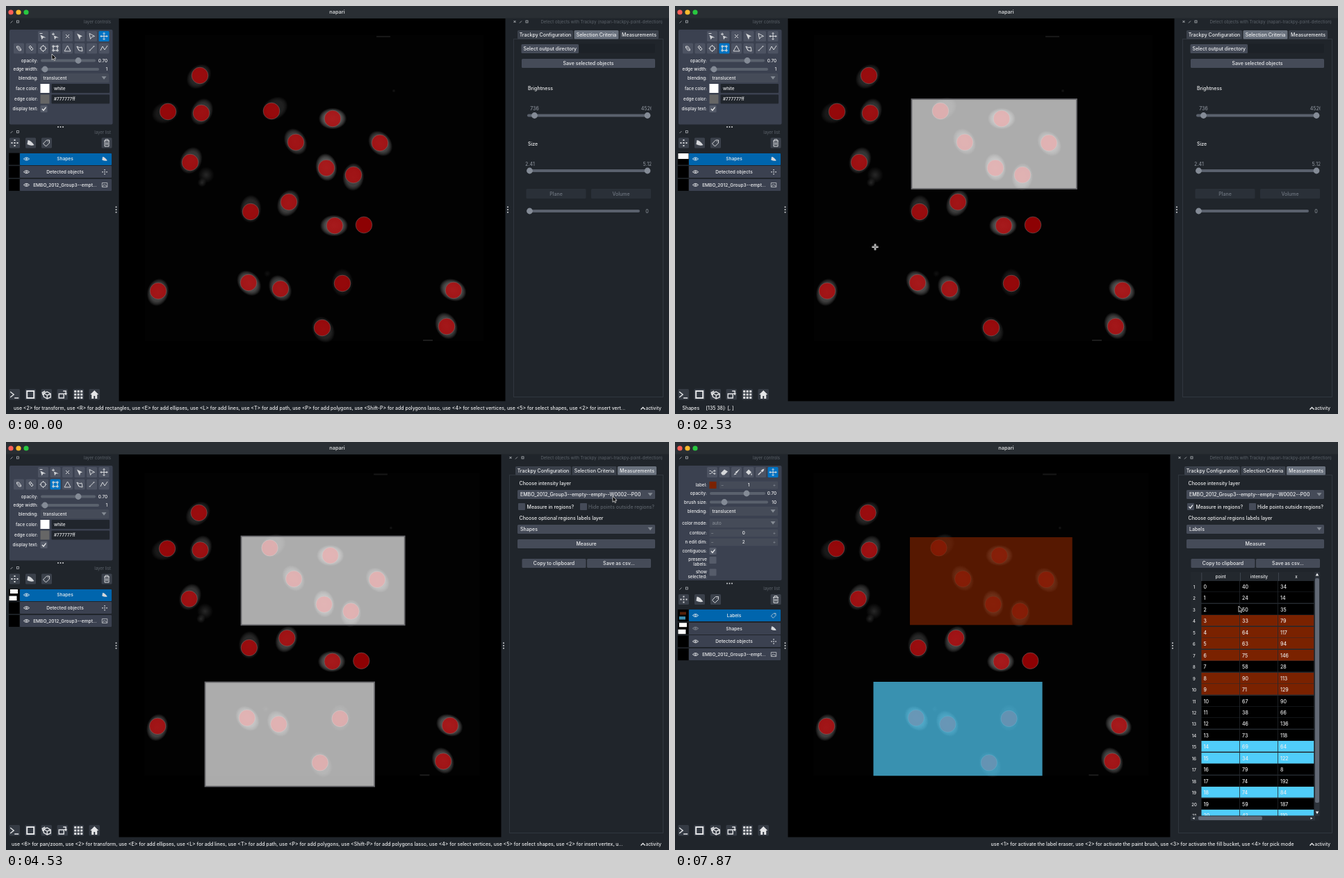
An HTML page with a canvas for the animation above (8000 ms loop, 954 by 587 pixels).

```html
<!DOCTYPE html>
<html>
<head>
<meta charset="utf-8">
<style>
html, body { margin: 0; width: 100%; height: 100%; overflow: hidden; background: #20252b; }
canvas { display: block; }
</style>
</head>
<body>
<canvas id="stage" width="954" height="587"></canvas>
<script>
const c = document.getElementById('stage').getContext('2d');
const BG = '#20252b', PANEL = '#3b4150', BTN = '#454b58', TRACK = '#5a616d', KNOB = '#848b96';
const BLUE = '#0065ad', TEXT = '#eeeff0', DIM = '#858b94', FAINT = '#5c636b', DARK = '#20252c';
const BROWN = '#7a2200', CYAN = '#50cdfa';
const LOOP = 8000, STEP = LOOP / 60;
const FILE = 'EMBO_2012_Group3--empty--empty--W0002--P00';

// x, y, halo angle, halo offset, halo brightness
const cells = [
  [279, 100, 135, 2, 24], [233, 152, 160, 4, 15], [281, 154, -65, 2, 32], [382, 151, -35, 6, 20],
  [470, 162, 0, 0, 55], [417, 196, -120, 1, 40], [538, 197, 50, 1, 44], [265, 225, -65, 3, 34],
  [461, 233, -100, 1, 52], [500, 243, 95, 3, 40], [407, 282, 115, 2, 40], [352, 296, -88, 4, 25],
  [473, 316, 180, 1, 50], [515, 315, 0, 0, 0], [219, 410, 105, 2, 42], [349, 398, 50, 1, 48],
  [395, 407, -120, 1, 42], [484, 399, -90, 1, 15], [644, 409, -155, 1, 50], [455, 463, 60, 3, 22],
  [634, 461, -115, 1, 44]];

const intensity = [40, 24, 50, 33, 64, 63, 75, 58, 90, 71, 67, 38, 46, 73, 69, 34, 79, 74, 74, 59, 42];
const column = [34, 14, 35, 79, 117, 94, 146, 28, 113, 129, 90, 66, 136, 118, 64, 122, 8, 192, 84, 187, 110];
const inTop = [3, 4, 5, 6, 8, 9], inBottom = [14, 15, 18, 20];

// time, x, y of the pointer
const path = [
  [0, 66, 69], [270, 69, 62], [550, 69, 62], [1070, 340, 137], [1200, 340, 137], [1330, 340.5, 134],
  [2000, 578, 263], [2130, 578, 263], [2500, 288, 347], [2600, 288, 346], [3190, 534, 497.5],
  [3470, 534, 497.5], [3950, 905, 40], [4150, 905, 40], [4520, 873, 78], [4700, 873, 78],
  [5200, 741, 92], [5500, 741, 92], [6100, 790, 128], [6650, 803, 154], [6850, 808, 146],
  [7150, 808, 146], [7600, 823, 232], [7730, 821, 238], [7860, 811, 236]];
const TOP = [340.5, 134, 578, 263], BOTTOM = [288, 346, 534, 497.5];

const p = s => new Path2D(s);
const icons = {
  vminus: [p('M-4-2L4 2L0 2L-2 5ZM-5-4.5H-1V-3.5H-5Z'), 1],
  vplus: [p('M-2-1L5 2L1 2L-1 5ZM-5-3.5H-1V-2.5H-5ZM-3.5-5H-2.5V-1H-3.5Z'), 1],
  x: [p('M-2.5-2.5L2.5 2.5M2.5-2.5L-2.5 2.5')], arrow: [p('M-4-4L4 0L1 1L0 5Z'), 1],
  select: [p('M-3.5-4L4 0L0 1L-2 4Z')],
  move: [p('M-5 0H5M0-5V5M-1.5-3.5L0-5L1.5-3.5M-1.5 3.5L0 5L1.5 3.5M-3.5-1.5L-5 0L-3.5 1.5M3.5-1.5L5 0L3.5 1.5')],
  front: [p('M-3-3H0L3 1V3H0L-3-1ZM-2-2L2 2')], back: [p('M-3-2L-1-4L3 1L1 3ZM-2 0L1-2')],
  ellipse: [p('M-3.5 0A3.5 3.5 0 1 0 3.5 0A3.5 3.5 0 1 0-3.5 0M-5 0H-3M3 0H5M0-5V-3M0 3V5')],
  rect: [p('M-3-3H3V3H-3ZM-4-4H-2V-2H-4ZM2-4H4V-2H2ZM-4 2H-2V4H-4ZM2 2H4V4H2Z')],
  tri: [p('M0-4L4.5 4H-4.5Z')], poly: [p('M-4-3L0-1L3-2L4 4L-1 3ZM-4-3L-1 3')],
  line: [p('M-3 3L3-3M-4 3H-2M2-3H4')], path: [p('M-5 3L-2-3L1 2L5-4')],
  shuffle: [p('M-4-2H-2L2 2H4M-4 2H-2L2-2H4M3-3.5L4.5-2L3-.5M3 .5L4.5 2L3 3.5')],
  eraser: [p('M-5 1L0-4L5-1L0 4H-3Z'), 1], brush: [p('M5-5L0 2L-2 0ZM-2 1L0 3L-4 4Z'), 1],
  fill: [p('M-4 0L0-4L4 0L0 4ZM4 1L5 4H3Z'), 1], picker: [p('M5-5L2-4L0-2L2 0L4-2ZM0-1L1 0L-3 4H-4V3Z'), 1],
  points: [p('M-1-1h2v2h-2zM-5-1h2v2h-2zM3-1h2v2h-2zM-1-5h2v2h-2zM-1 3h2v2h-2z'), 1],
  shapes: [p('M-4-4Q0-4 5 3Q1 5-5 2Z'), 1], tag: [p('M-5 1L0-4H4V0L-1 5ZM2-2.5V-1.5')],
  trash: [p('M-4-3H4M-2-3V-5H2V-3M-3-3V5H3V-3M-1-1V3M1-1V3')],
  eye: [p('M-4 0Q0-4 4 0Q0 4-4 0M-1 0A1 1 0 1 0 1 0A1 1 0 1 0-1 0')],
  image: [p('M-5-4H5V4H-5ZM-4 3L-1-1L1 1L2 0L4 3')],
  console: [p('M-6-4L-1 0L-6 4M0 5H6')], square: [p('M-5-5H5V5H-5Z')],
  cube: [p('M-4-2L1-4L6-1V4L1 6L-4 3ZM-4-2L1 1L6-1M1 1V6M-5 1L-6-3L-2-5')],
  roll: [p('M-5-1H2V5H-5ZM1-5H5V0M3-2L5 0L6-2')],
  grid: [p('M-6-6h3v3h-3zM-1.5-6h3v3h-3zM3-6h3v3h-3zM-6-1.5h3v3h-3zM-1.5-1.5h3v3h-3zM3-1.5h3v3h-3zM-6 3h3v3h-3zM-1.5 3h3v3h-3zM3 3h3v3h-3z'), 1],
  home: [p('M0-6L6 0H4V6H1V2H-1V6H-4V0H-6Z'), 1]
};

function text(s, x, y, size = 7, color = TEXT, align = 'left', weight = 500) {
  c.font = `${weight} ${size}px Inter, "Open Sans", sans-serif`;
  c.textAlign = align;
  c.fillStyle = color;
  c.fillText(s, x, y + size * .36);
}
function box(x, y, w, h, color, r = 0) {
  c.fillStyle = color;
  c.beginPath();
  c.roundRect(x, y, w, h, r);
  c.fill();
}
function dot(x, y, r, color) {
  c.fillStyle = color;
  c.beginPath();
  c.arc(x, y, r, 0, 7);
  c.fill();
}
function icon(name, x, y, color = '#d5d7da', width = 1) {
  const [shape, solid] = icons[name];
  c.save();
  c.translate(x, y);
  c.fillStyle = c.strokeStyle = color;
  c.lineWidth = width;
  solid ? c.fill(shape) : c.stroke(shape);
  c.restore();
}
function clipped(x, y, w, h, draw) {
  c.save();
  c.beginPath();
  c.rect(x, y, w, h);
  c.clip();
  draw();
  c.restore();
}
function triangle(x, y, w, h, color = DIM) {
  c.fillStyle = color;
  c.beginPath();
  c.moveTo(x - w, y - h);
  c.lineTo(x + w, y - h);
  c.lineTo(x, y + h);
  c.fill();
}
function button(s, x, y, w, h = 13, color = TEXT, fill = BTN) {
  box(x, Math.round(y - h / 2), w, h, fill, 1.5);
  text(s, x + w / 2, y, 7, color, 'center');
}
function combo(s, x, y, w, size = 7, color = TEXT) {
  box(x, Math.round(y - 6.5), w, 13, BTN, 1.5);
  clipped(x, y - 7, w - 18, 14, () => text(s, x + 4, y, size, color));
  triangle(x + w - 7, y, 3.5, 2.2);
}
function check(x, y, on, fill = '#565c6a') {
  box(x - 5, y - 5, 10, 10, fill, 1);
  if (!on) return;
  c.strokeStyle = TEXT;
  c.lineWidth = 1.2;
  c.stroke(p(`M${x - 2.5} ${y}l2 2.2l3.5-4.5`));
}
function track(x1, x2, y, ...knobs) {
  box(x1, y - 2, x2 - x1, 4, TRACK, 2);
  knobs.forEach(k => dot(k, y, 4.4, KNOB));
}
function dots(x, y, dx, dy) {
  for (let i = -1; i < 2; i++) dot(x + i * dx, y + i * dy, 1, '#d0d2d5');
}
function header(s, x, y, right) {
  c.strokeStyle = '#b0b4b8';
  c.lineWidth = .8;
  c.stroke(p(`M${x - 1.5} ${y + 1.5}l3-3`));
  c.strokeRect(x + 7.5, y - 2, 3, 3);
  text(s, right, y, 6.1, FAINT, 'right', 400);
}

function pointer(t) {
  let i = path.findIndex(k => k[0] > t);
  if (i < 0) return path[path.length - 1].slice(1);
  const [t0, x0, y0] = path[i - 1], [t1, x1, y1] = path[i];
  const u = (t - t0) / (t1 - t0), e = u * u * (3 - 2 * u);
  return [x0 + (x1 - x0) * e, y0 + (y1 - y0) * e];
}

function cell([x, y, angle, shift, light]) {
  if (light) {
    c.save();
    c.translate(x, y);
    c.rotate(angle * Math.PI / 180);
    c.translate(shift, 0);
    c.scale(1.3, 1);
    const g = c.createRadialGradient(0, 0, 0, 0, 0, 15.5);
    const gray = a => `rgba(175,175,175,${light / 100 * a})`;
    g.addColorStop(0, gray(1));
    g.addColorStop(.65, gray(.85));
    g.addColorStop(.83, gray(.5));
    g.addColorStop(1, gray(0));
    c.fillStyle = g;
    c.fillRect(-16, -16, 32, 32);
    c.restore();
  }
  dot(x, y, 11.8, 'rgba(200,0,4,.7)');
  c.strokeStyle = 'rgba(119,119,119,.6)';
  c.lineWidth = .8;
  c.stroke();
}

function region([x1, y1, x2, y2], active) {
  c.fillStyle = 'rgba(255,255,255,.67)';
  c.fillRect(x1, y1, x2 - x1, y2 - y1);
  c.strokeStyle = active ? '#0a7ac8' : '#66666a';
  c.lineWidth = 1.8;
  c.strokeRect(x1, y1, x2 - x1, y2 - y1);
  if (active) [[x1, y1], [x2, y1], [x1, y2], [x2, y2]].forEach(q => dot(...q, 3, '#0a7ac8'));
}

function viewer(s) {
  const right = s.measure ? 712.5 : 718.5;
  clipped(162.5, 18, right - 162.5, 550.5, () => {
    box(162, 18, 560, 551, '#000');
    if (s.measure) {
      c.translate(437.5, 293);
      c.scale(.9904, .9904);
      c.translate(-440.5, -293);
    }
    box(200, 42, 487, 440, '#020202');
    box(533, 43, 20, 2, '#171717');
    box(600, 480, 14, 2, '#1c1c1c');
    [[288, 243, 9, .2], [282, 254, 5, .2], [376, 385, 4, .08], [558, 122, 2, .12]].forEach(([x, y, r, a]) => {
      const g = c.createRadialGradient(x, y, 0, x, y, r * 1.3);
      g.addColorStop(0, `rgba(190,190,190,${a})`);
      g.addColorStop(1, 'rgba(190,190,190,0)');
      dot(x, y, r * 1.3, g);
    });
    cells.forEach(cell);
    if (s.labels) {
      c.globalAlpha = .7;
      box(340, 135.5, 236, 127.5, BROWN);
      box(287, 345.5, 245.5, 136.5, CYAN);
    } else {
      s.shapes.forEach((r, i) => region(r, i === s.active));
    }
  });
}

function slot(name, x, y, on) {
  box(x - 7.5, y - 7.5, 15, 15, on ? '#0074c4' : '#4d5362', 1.5);
  icon(name, x, y);
}
const label = (s, y) => text(s, 46, y, 6.3, TEXT, 'right');
const value = (s, y) => text(s, 146, y, 6.3, TEXT, 'right');
function spin(s, x, y) {
  box(x, y - 5.5, 148 - x, 11, BTN, 1);
  text('−', x + 2, y, 6.5, DIM);
  text(s, (x + 148) / 2, y, 6.3, TEXT, 'center');
  text('+', 143, y, 6.5, DIM, 'center');
}

function controls(s) {
  header('layer controls', 8, 23, 151);
  box(5, 34, 148.5, s.labels ? 165 : 136.5, PANEL, 2);
  const tools = s.labels ? ['shuffle', 'eraser', 'brush', 'fill', 'picker', 'move']
    : ['vminus', 'vplus', 'x', 'arrow', 'select', 'move'];
  tools.forEach((n, i) => slot(n, 53.5 + i * 17.5, 43.5, n === 'move' && !s.rectTool));
  if (s.labels) {
    label('label:', 62);
    box(49.5, 57, 10, 10, BROWN);
    spin('1', 64, 62);
    label('opacity:', 74); track(50, 130, 74, 103); value('0.70', 74);
    label('brush size:', 86.5); track(50, 134, 86.5, 71); value('10', 86.5);
    label('blending:', 99.5); combo('translucent', 49.5, 99.5, 98.5, 6.3);
    label('color mode:', 116.5); combo('auto', 49.5, 116.5, 98.5, 6.3, DIM);
    label('contour:', 131); spin('0', 49.5, 131);
    label('n edit dim:', 144); spin('2', 49.5, 144);
    label('contiguous:', 157); check(54.5, 157, true);
    label('preserve', 169); label('labels:', 176); check(54.5, 170);
    label('show', 187); label('selected:', 194); check(54.5, 187.5);
    return;
  }
  ['front', 'back', 'ellipse', 'rect', 'tri', 'poly', 'line', 'path'].forEach((n, i) =>
    slot(n, 18.5 + i * 17.5, 61, n === 'rect' && s.rectTool));
  label('opacity:', 78.5); track(50, 129, 78.5, 104); value('0.70', 78.5);
  label('edge width:', 91); track(50, 134, 91, 56); value('1', 91);
  label('blending:', 103.5); combo('translucent', 49.5, 103.5, 98.5, 6.3);
  [['face color:', 'white', '#fff', 118.5], ['edge color:', '#777777ff', '#666', 134]].forEach(([a, b, fill, y]) => {
    label(a, y);
    box(49.5, y - 6.5, 13, 13, fill);
    box(65.5, y - 6.5, 83.5, 13, DARK, 1);
    text(b, 69, y, 6.3);
  });
  label('display text:', 148); check(54.5, 148, true);
}

function layers(s) {
  const dy = s.labels ? 29.5 : 0;
  dots(78.5, 174 + dy, 3.5, 0);
  header('layer list', 8, 181.5 + dy, 151);
  [['points', 12.5], ['shapes', 35.5], ['tag', 58.5], ['trash', 145]].forEach(([n, x]) => {
    box(x - 7.5, 189.5 + dy, 15, 15, '#3b414b', 1.5);
    icon(n, x, 197 + dy);
  });
  const rows = [['Shapes', 'shapes'], ['Detected objects', 'points'], [FILE.slice(0, 22) + '...', 'image']];
  if (s.labels) rows.unshift(['Labels', 'tag']);
  rows.forEach(([name, kind], i) => {
    const y = 220 + dy + i * 18.7;
    box(4, y - 8.5, 15.5, 17, '#000');
    box(20, Math.round(y - 8.5), 132, 17, i ? PANEL : BLUE, 1);
    icon('eye', 29.5, y, s.labels && name === 'Shapes' ? DIM : TEXT, .9);
    text(name, 85, y, 6.6, TEXT, 'center');
    c.save();
    c.translate(142, y);
    c.scale(.75, .75);
    icon(kind, 0, 0);
    c.restore();
    if (name === 'Shapes') {
      if (s.thumbs === 1) box(4.5, y - 8, 15, 8, '#fff');
      if (s.thumbs > 1) { box(6, y - 8, 11, 6, '#fff'); box(4.5, y + 1.5, 11, 6.5, '#fff'); }
    }
    if (name === 'Labels') { box(7, y - 5, 9, 4, '#54200a'); box(6, y + 1.5, 9, 4.5, '#3a8cae'); }
  });
}

function selection() {
  const idle = ['#6f7680', '#2a3038'];
  button('Select output directory', 741.5, 61, 82.5);
  box(825, 54.5, 109, 13, '#1c2127', 1);
  button('Save selected objects', 742, 82.5, 192);
  text('Brightness', 751, 118.5);
  text('Size', 751, 198);
  clipped(747.5, 140, 181, 100, () => {
    text('736', 760.5, 147.5, 7, DIM, 'center');
    text('4526', 922.5, 147.5, 7, DIM, 'center');
    text('2.41', 754, 227, 7, DIM, 'center');
    text('5.12', 923, 227, 7, DIM, 'center');
  });
  track(750, 927, 157.5, 760.5, 923);
  track(750, 927, 237, 753.5, 923);
  button('Plane', 748.5, 270, 86, 14, ...idle);
  button('Volume', 842, 270, 86, 14, ...idle);
  track(750, 912, 295, 753.5);
  text('0', 922.5, 295, 7, DIM, 'center');
}

function table() {
  const edges = [757.5, 813, 868, 920], top = 200, pitch = 16.45;
  box(742, 187, 185.5, 358, '#23282e');
  ['point', 'intensity', 'x'].forEach((s, i) => {
    text(s, (edges[i] + edges[i + 1]) / 2, 194, 6.2, TEXT, 'center');
    box(edges[i], 188, .7, 12, '#4a515b');
  });
  clipped(742, 200, 179, 337.5, () => intensity.forEach((v, i) => {
    const y = Math.round(top + i * pitch);
    const fill = inTop.includes(i) ? BROWN : inBottom.includes(i) ? CYAN : '#000';
    text(i + 1, 747, y + 8.9, 6, TEXT, 'center');
    [i, v, column[i]].forEach((s, k) => {
      box(edges[k], y, edges[k + 1] - edges[k] - .8, pitch - .9, fill);
      text(s, edges[k] + 3, y + 8.2);
    });
  }));
  box(920.5, 187, 7, 351, '#2d333b');
  box(921, 196, 6, 323, '#626975', 2);
  box(742, 538, 179, 6.5, '#2d333b');
  box(753, 538.5, 92, 5.5, '#626975', 2);
  triangle(924, 190.5, 2.2, -2, TEXT);
  triangle(924, 533.5, 2.2, 2, TEXT);
  text('◂', 746, 541, 6, TEXT, 'center');
  text('▸', 916, 541, 6, TEXT, 'center');
}

function measurements(s) {
  text('Choose intensity layer', 738.5, 59.5);
  combo(FILE, 736, 75.5, 198);
  check(742, 93, s.checked, '#454b58');
  text('Measure in regions?', 749.5, 93);
  check(831, 93, false, '#454b58');
  text('Hide points outside regions?', 838, 93, 7, s.checked ? TEXT : FAINT);
  text('Choose optional regions labels layer', 738.5, 109);
  combo(s.labels ? 'Labels' : 'Shapes', 736, 125, 198);
  button('Measure', 736, 146, 198);
  button('Copy to clipboard', 742.5, 174, 92);
  button('Save as csv...', 836, 174, 92);
  if (s.labels) table();
}

function dock(s) {
  const dx = s.measure ? -6 : 0, tx = s.measure ? -3 : 0;
  header('Detect objects with Trackpy (napari-trackpy-point-detection)', 740.5 + dx, 23, 945);
  c.save();
  c.translate(732 + dx, 22.5);
  c.scale(.6, .6);
  icon('x', 0, 0, '#c8cbce', 1.4);
  c.restore();
  dots(722 + dx, 293, 0, 3.7);
  c.strokeStyle = '#30363e';
  c.lineWidth = 1;
  c.strokeRect(730.5 + dx, 47.5, 215 - dx, 515);
  [['Trackpy Configuration', 736, 80], ['Selection Criteria', 817.5, 64], ['Measurements', 883, 56]].forEach(([n, x, w], i) =>
    button(n, x + tx, 41, w, 12.5, TEXT, i === (s.measure ? 2 : 1) ? '#69717d' : '#3b414b'));
  s.measure ? measurements(s) : selection();
}

const keyHelp = list => list.map(([k, what]) => `use <${k}> for ${what}`).join(', ');
const common = [['L', 'add lines'], ['T', 'add path'], ['P', 'add polygons'], ['Shift-P', 'add polygons lasso'],
  ['4', 'select vertices'], ['5', 'select shapes']];
const moveHelp = keyHelp([['2', 'transform'], ['R', 'add rectangles'], ['E', 'add ellipses'], ...common, ['2', 'insert vert...']]);
const rectHelp = keyHelp([['6', 'pan/zoom'], ['2', 'transform'], ['E', 'add ellipses'], ...common, ['2', 'insert vertex, u...']]);
const labelHelp = keyHelp([['1', 'activate the label eraser'], ['2', 'activate the paint brush'],
  ['3', 'activate the fill bucket'], ['4', 'pick mode']]);

function status(s, x, y) {
  const size = 6.93;
  if (s.labels) text(labelHelp, 890.5, 578.5, size, TEXT, 'right');
  else if (s.over) {
    const d = y - 137, row = Math.round(43 + .4564 * d - 8.7e-5 * d * d), col = Math.round((x - 198) / 2.365);
    text('Shapes', 10.5, 578.5, size);
    text(`[${row} ${col}]: ${s.active < 0 ? '[, ]' : s.active + ', 4'}`, 44.5, 578.5, size);
  } else text(s.rectTool ? rectHelp : moveHelp, s.rectTool ? 8 : 11, 578.5, size);
  c.strokeStyle = TEXT;
  c.lineWidth = 1.3;
  c.stroke(p('M913.5 580.5l3-3l3 3'));
  text('activity', 920.5, 578.5, 6.4);
}

function cursor(s, x, y) {
  if (s.over && s.rectTool) {
    const cross = p(`M${x - 4.5} ${y}h9M${x} ${y - 4.5}v9`);
    c.strokeStyle = '#fff';
    c.lineWidth = 2.6;
    c.stroke(cross);
    c.strokeStyle = '#333';
    c.lineWidth = .8;
    c.stroke(cross);
    return;
  }
  const arrow = p(`M${x} ${y}v8.5l2-1.8l1.3 2.8l1.4-.6l-1.3-2.8h2.6z`);
  c.fillStyle = '#000';
  c.fill(arrow);
  c.strokeStyle = '#e8e8e8';
  c.lineWidth = .8;
  c.stroke(arrow);
}

function draw(t) {
  const [x, y] = pointer(t);
  const s = {
    rectTool: t > 390 && t < 7190, measure: t > 4120, checked: t > 5320, labels: t > 7190,
    over: x > 163 && x < 718 && y > 18 && y < 568,
    thumbs: t > 3590 ? 2 : t > 2120 ? 1 : 0,
    active: t > 1330 && t < 2120 ? 0 : t > 2600 && t < 3460 ? 1 : -1, shapes: []
  };
  if (t > 1330) s.shapes.push(t < 2000 ? [TOP[0], TOP[1], x, y] : TOP);
  if (t > 2600) s.shapes.push(t < 3190 ? [BOTTOM[0], BOTTOM[1], x, y] : BOTTOM);

  box(0, 0, 954, 587, BG);
  box(0, 0, 954, 17.5, '#292e33');
  ['#ff5f57', '#febc2e', '#28c840'].forEach((col, i) => dot(7 + i * 11, 9, 3.6, col));
  text('napari', 476.5, 8.5, 7.3, '#d2d4d6', 'center', 600);
  viewer(s);
  dots(158.5, 293, 0, 3.7);
  controls(s);
  layers(s);
  ['console', 'square', 'cube', 'roll', 'grid', 'home'].forEach((n, i) => {
    box(4.5 + i * 23, 551, 15.5, 15.5, '#353b44', 1.5);
    icon(n, 12.2 + i * 23, 559, '#e4e5e7', n === 'square' ? 2 : 1.4);
  });
  dock(s);
  status(s, x, y);
  cursor(s, x, y);
}

const start = performance.now();
function tick() {
  const t = (performance.now() - start) % LOOP;
  draw(Math.floor((t + 5) / STEP) % 60 * STEP);
  requestAnimationFrame(tick);
}
tick();
</script>
</body>
</html>
```
